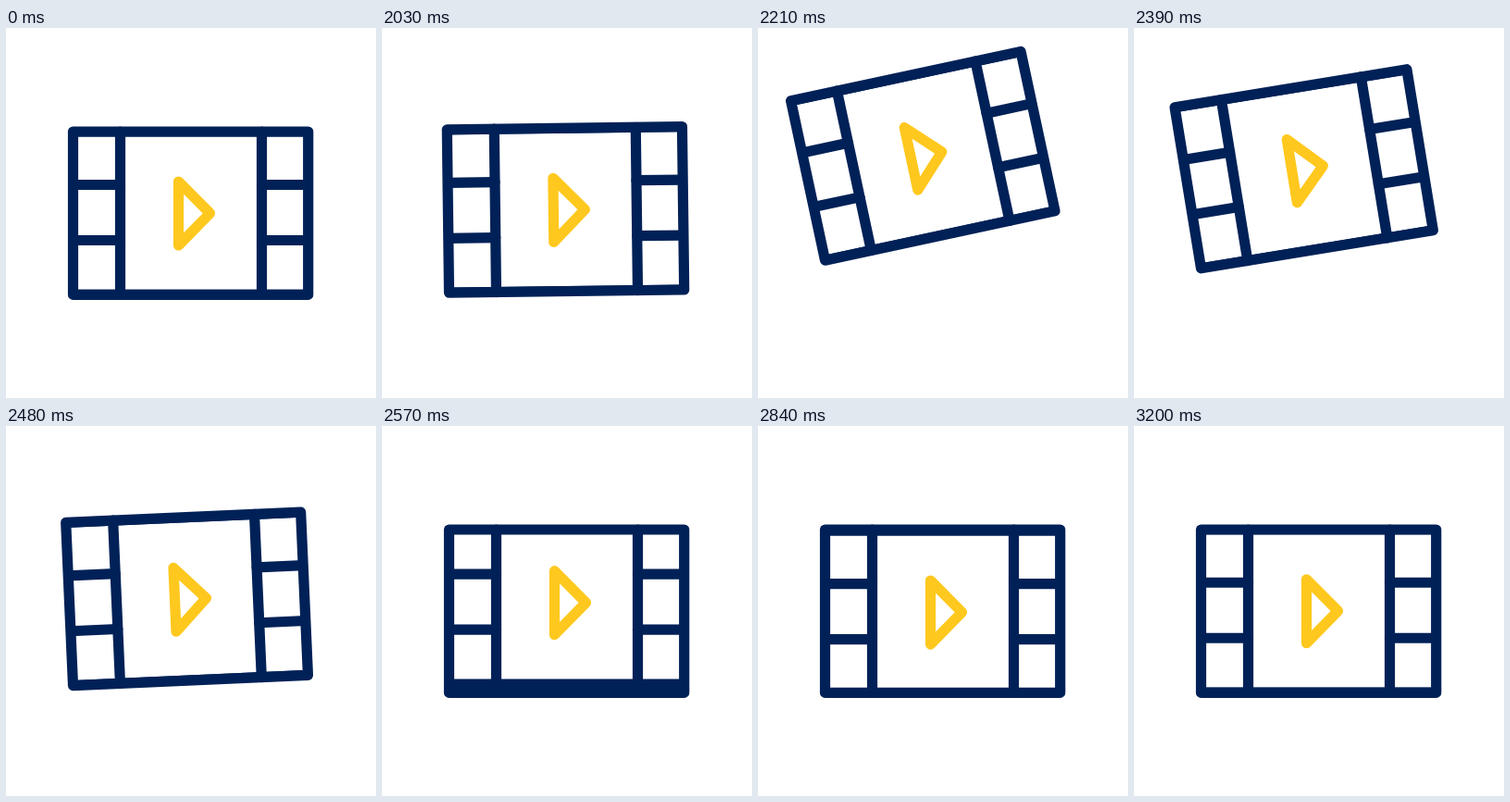
Animation of 400x400 px, one loop 3.29 s. Source, as an HTML page with a canvas:

```html
<!DOCTYPE html>
<html lang="en">
<head>
<meta charset="utf-8">
<title>Film strip</title>
<style>
  html, body { margin: 0; width: 100%; height: 100%; overflow: hidden; background: #fff; }
  canvas { display: block; width: 400px; height: 400px; }
</style>
</head>
<body>
<canvas id="stage" width="400" height="400"></canvas>
<script>
const ctx = document.getElementById('stage').getContext('2d');
const LOOP = 3290, STEP = 30;
const TILT_START = 2000, TILT_STEPS = 18, LAST_STEP = 40;
const NAVY = '#002157', YELLOW = '#ffc81e';
const LEFT = 72.5, RIGHT = 326.7, TOP = 112, BOTTOM = 288.4;
const PITCH = BOTTOM - TOP;
const BARS = [123.5, 276.5];

// Cubic Bezier easing with flat ends, solved for x by bisection
function ease(x, x1, x2) {
  let lo = 0, hi = 1, s = 0.5;
  for (let i = 0; i < 30; i++) {
    s = (lo + hi) / 2;
    const r = 1 - s;
    if (3 * r * r * s * x1 + 3 * r * s * s * x2 + s * s * s < x) lo = s;
    else hi = s;
  }
  return s * s * (3 - 2 * s);
}

// Remaining part of a damped spring after a number of steps
function spring(n) {
  const decay = 0.2665, freq = 0.236;
  return Math.exp(-decay * n) *
    (Math.cos(freq * n) + decay / freq * Math.sin(freq * n));
}

function stroke(color, points, closed) {
  ctx.strokeStyle = color;
  ctx.beginPath();
  points.forEach(([x, y]) => ctx.lineTo(x, y));
  if (closed) ctx.closePath();
  ctx.stroke();
}

function drawCell(shift) {
  const rung = (x1, x2, y) => stroke(NAVY, [[x1, y + shift], [x2, y + shift]]);
  rung(LEFT, RIGHT, TOP);
  for (const y of [169.5, 229.5]) {
    rung(LEFT, BARS[0], y);
    rung(BARS[1], RIGHT, y);
  }
  stroke(YELLOW, [[186.5, 166 + shift], [220.5, 200.3 + shift], [186.5, 235 + shift]], true);
}

function draw(time) {
  const step = Math.min(LAST_STEP, Math.max(0, Math.floor((time - TILT_START) / STEP)));
  const half = TILT_STEPS / 2;
  const lift = step < TILT_STEPS ? ease(1 - Math.abs(step - half) / half, 0.26, 0.5) : 0;
  const roll = step > TILT_STEPS ? PITCH * spring(step - TILT_STEPS) : 0;

  ctx.fillStyle = '#fff';
  ctx.fillRect(0, 0, 400, 400);
  ctx.lineWidth = 11.2;
  ctx.lineCap = ctx.lineJoin = 'round';

  ctx.save();
  ctx.translate(LEFT, BOTTOM - 40 * lift);
  ctx.rotate(-13 * lift * Math.PI / 180);
  ctx.translate(-LEFT, -BOTTOM);

  ctx.save();
  ctx.beginPath();
  ctx.rect(LEFT, TOP, RIGHT - LEFT, PITCH);
  ctx.clip();
  for (const k of [-1, 0, 1]) drawCell(roll + k * PITCH);
  ctx.restore();

  for (const x of BARS) stroke(NAVY, [[x, TOP], [x, BOTTOM]]);
  stroke(NAVY, [[LEFT, TOP], [RIGHT, TOP], [RIGHT, BOTTOM], [LEFT, BOTTOM]], true);
  ctx.restore();
}

const start = performance.now();
function tick() {
  draw((performance.now() - start) % LOOP);
  requestAnimationFrame(tick);
}
tick();
</script>
</body>
</html>
```
